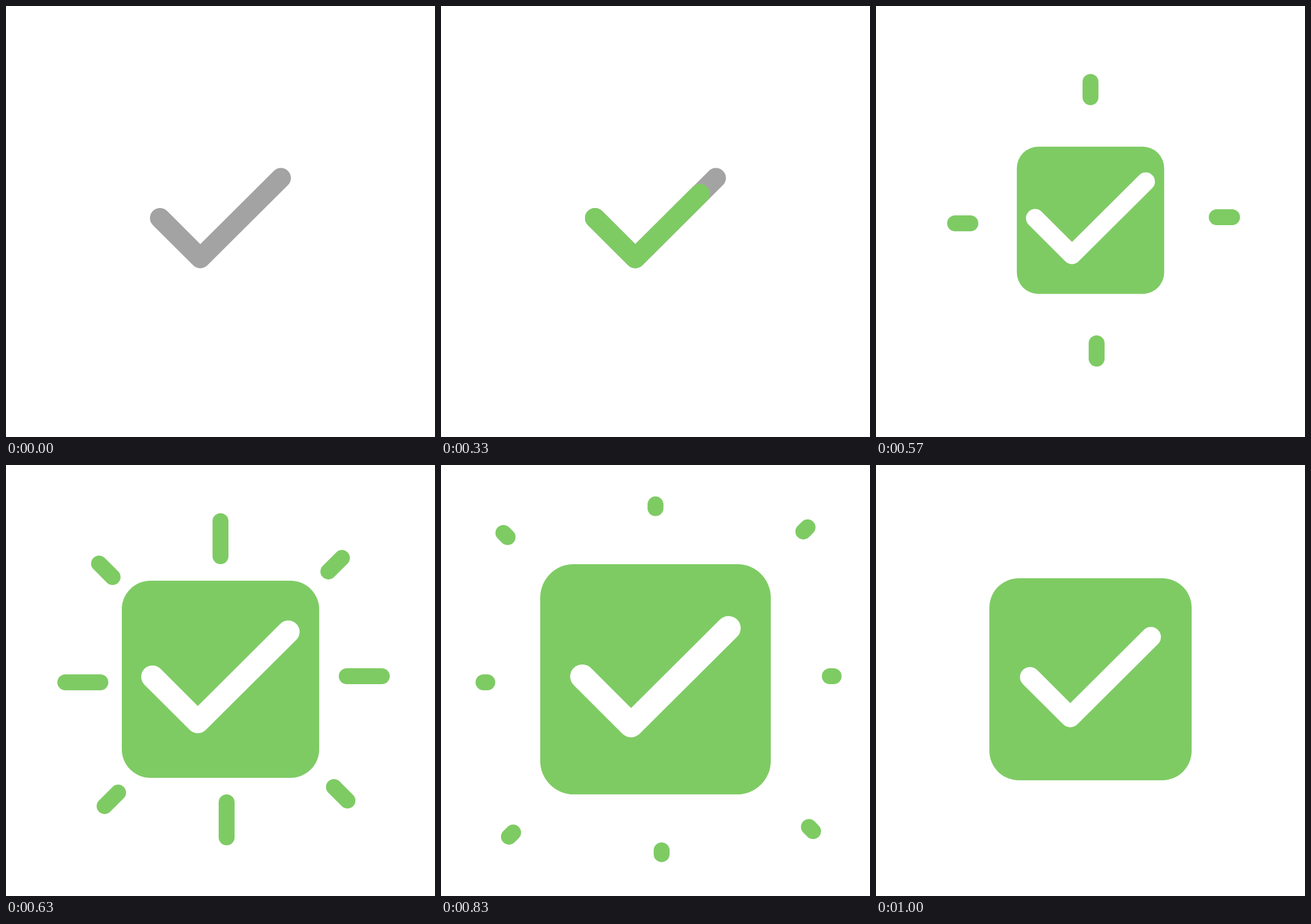
Write an HTML page with a canvas that moves like this. It is 700 by 704 pixels and loops after 1530 ms.

```html
<!DOCTYPE html>
<html lang="en">
<head>
<meta charset="utf-8">
<title>Check mark</title>
<style>
  html, body { margin: 0; width: 100%; height: 100%; overflow: hidden; background: #fff; }
  canvas { display: block; width: 700px; height: 704px; }
</style>
</head>
<body>
<canvas id="stage" width="700" height="704"></canvas>
<script>
const ctx = document.getElementById('stage').getContext('2d');
const LOOP = 1530, STEP = 1000 / 30;
const GREEN = '#7ecb64', GRAY = '#a3a3a3', WHITE = '#fff';
const CHECK = [[-98.7, -3.7], [-33, 62], [98.5, -69]];

const clamp = v => Math.min(1, Math.max(0, v));
const span = (t, a, b) => clamp((t - a) / (b - a));
const easeOut = (u, p) => 1 - Math.pow(1 - u, p);
const smooth = u => u * u * (3 - 2 * u);
const mix = (a, b, u) => a + (b - a) * u;

function scaled(s, draw) {
  ctx.save();
  ctx.translate(350, 350);
  ctx.scale(s, s);
  draw();
  ctx.restore();
}

// Strokes the check mark up to the given share of its length.
function check(color, part = 1) {
  if (part <= 0) return;
  const [a, b, c] = CHECK;
  const first = Math.hypot(b[0] - a[0], b[1] - a[1]);
  const second = Math.hypot(c[0] - b[0], c[1] - b[1]);
  const len = part * (first + second);
  const u = clamp(len / first), v = clamp((len - first) / second);
  ctx.beginPath();
  ctx.moveTo(...a);
  ctx.lineTo(mix(a[0], b[0], u), mix(a[1], b[1], u));
  if (v > 0) ctx.lineTo(mix(b[0], c[0], v), mix(b[1], c[1], v));
  ctx.strokeStyle = color;
  ctx.lineWidth = 32.8;
  ctx.stroke();
}

function box() {
  ctx.beginPath();
  ctx.roundRect(-165, -165, 330, 330, 48);
  ctx.fillStyle = GREEN;
  ctx.fill();
}

// Four rays, a quarter turn apart; the inner end follows the outer one.
function rays(t, { x, y, turn, shift, from, to, start, lag }) {
  if (t <= start + 1 || t >= start + lag + 299) return;
  const reach = begin => mix(from, to, easeOut(span(t, begin, begin + 600), 6));
  const outer = reach(start), inner = reach(start + lag);
  ctx.strokeStyle = GREEN;
  ctx.lineWidth = 26;
  for (let i = 0; i < 4; i++) {
    ctx.save();
    ctx.translate(x, y);
    ctx.rotate(turn + i * Math.PI / 2);
    ctx.beginPath();
    ctx.moveTo(shift, -inner);
    ctx.lineTo(shift, -outer);
    ctx.stroke();
    ctx.restore();
  }
}

const STRAIGHT = { x: 355, y: 350, turn: 0, shift: -5, from: 201, to: 287, start: 16 * STEP, lag: 100 };
const DIAGONAL = { x: 354.5, y: 354.5, turn: Math.PI / 4, shift: -6.4, from: 249, to: 356.5, start: 18 * STEP, lag: 2 * STEP };

function render(t) {
  const pop = 14 * STEP, peak = 25 * STEP;
  ctx.fillStyle = WHITE;
  ctx.fillRect(0, 0, 700, 704);
  ctx.lineCap = ctx.lineJoin = 'round';

  if (t < pop + 1) {
    const drawn = span(t, STEP, 379);
    scaled(mix(1, 0.05, Math.pow(span(t, 375, pop), 2)), () => {
      if (drawn < 1) check(GRAY);
      check(GREEN, drawn);
    });
    return;
  }
  const grow = span(t, pop, peak), back = smooth(span(t, peak, 1000));
  rays(t, STRAIGHT);
  rays(t, DIAGONAL);
  scaled(mix(1.14 * easeOut(grow, 3.2), 1, back), box);
  scaled(mix(mix(0.05, 1.21, easeOut(grow, 4.3)), 1, back), () => check(WHITE));
}

function tick() {
  const t = performance.now() % LOOP;
  render(Math.floor((t + 4) / STEP) * STEP);
  requestAnimationFrame(tick);
}
tick();
</script>
</body>
</html>
```
